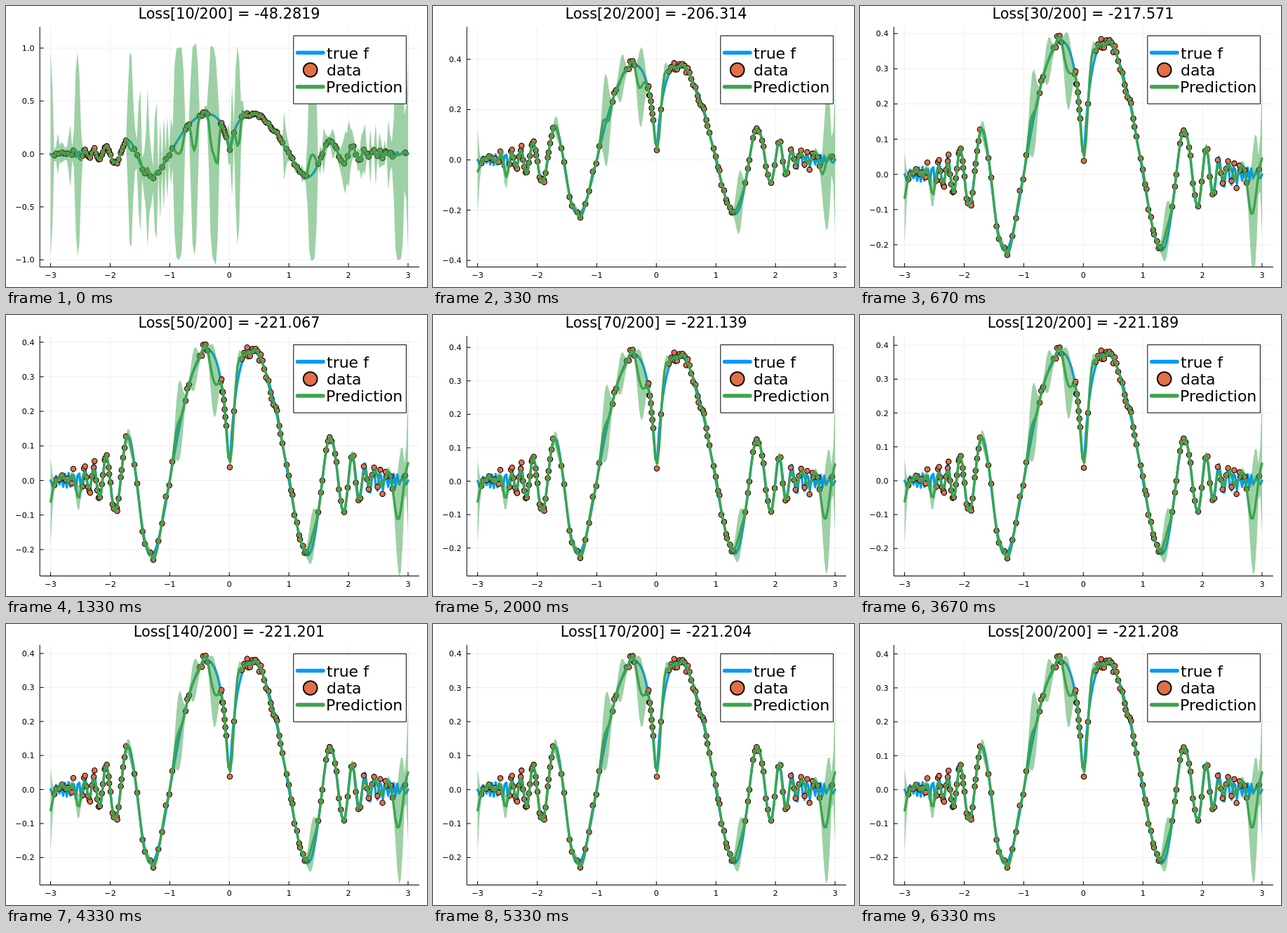
An HTML page with a canvas for the animation above (6660 ms loop, 600 by 400 pixels).

```html
<!DOCTYPE html>
<html lang="en">
<head>
<meta charset="utf-8">
<title>Gaussian process fit</title>
<style>
  html, body { margin: 0; width: 100%; height: 100%; overflow: hidden; background: #fff; }
  canvas { display: block; }
</style>
</head>
<body>
<canvas id="stage" width="600" height="400"></canvas>
<script>
const ctx = document.getElementById('stage').getContext('2d');
const BLUE = '#009af9', ORANGE = '#e26f46', GREEN = '#3da44d';
const LEFT = 48.2, RIGHT = 588.5, TOP = 30, BOTTOM = 371.5;

const toPx = x => 318.3 + 84.9 * x;
const toX = px => (px - 318.3) / 84.9;
const lerp = (a, b, t) => a + (b - a) * t;
const dot = (a, b) => a.reduce((sum, v, i) => sum + v * b[i], 0);

// sinc(|x|^|x|)
function trueF(x) {
  const u = Math.PI * Math.abs(x) ** Math.abs(x);
  return Math.sin(u) / u;
}

let seed = 7;
function random() {
  seed = seed * 16807 % 2147483647;
  return seed / 2147483647;
}

// Noisy samples in clusters: from px, to px, count
const clusters = [
  [69, 96, 9], [109, 171, 33], [183, 237, 11], [256, 261, 3], [276, 287, 5], [306, 314, 8],
  [319, 325, 2], [336, 394, 24], [400, 428, 11], [445, 482, 12], [487, 551, 18], [569, 569, 1]
];
const data = clusters.flatMap(([from, to, count]) =>
  Array.from({ length: count }, (_, i) => {
    const inner = i > 0 && i < count - 1;
    const shift = inner ? 0.8 * (random() - 0.5) : 0;
    const x = toX(lerp(from, to, (i + shift) / Math.max(1, count - 1)));
    return { x, y: trueF(x) + 0.02 * (random() + random() - 1) };
  }));
const grid = Array.from({ length: 200 }, (_, i) => -3 + 6 * i / 199);

// Solves L v = b for a lower triangular L.
function forward(L, b) {
  const v = [];
  for (let i = 0; i < b.length; i++) {
    let sum = b[i];
    for (let j = 0; j < i; j++) sum -= L[i][j] * v[j];
    v.push(sum / L[i][i]);
  }
  return v;
}

// Gaussian process regression; training lengthens the kernel.
function predict(step) {
  const untrained = Math.exp((10 - step) / 6);
  const length = lerp(0.11, 0.036, untrained);
  const variance = lerp(0.55, 1, untrained) ** 2;
  const kernel = (a, b) => variance * Math.exp(-(((a - b) / length) ** 2) / 2);
  const L = [];
  data.forEach((p, i) => {
    const row = forward(L, data.slice(0, i).map(q => kernel(p.x, q.x)));
    row.push(Math.sqrt(variance + 0.0002 - dot(row, row)));
    L.push(row);
  });
  const beta = forward(L, data.map(p => p.y));
  return grid.map(x => {
    const v = forward(L, data.map(p => kernel(x, p.x)));
    return { px: toPx(x), mean: dot(v, beta), std: Math.sqrt(Math.max(0, variance - dot(v, v))) };
  });
}

// step, loss, y of zero, px per unit
const keys = [
  [10, -48.2819, 210.6, 150.7],
  [20, -206.314, 219, 358],
  [30, -217.571, 239.6, 501],
  [50, -221.067, 235.5, 492],
  [70, -221.139, 236.6, 476],
  [100, -221.177, 236.2, 480],
  [140, -221.201, 235.6, 484],
  [200, -221.208, 235.8, 483]
];
function stateAt(step) {
  const n = Math.max(1, keys.findIndex(k => k[0] >= step));
  const a = keys[n - 1], b = keys[n];
  return a.map((v, i) => lerp(v, b[i], (step - a[0]) / (b[0] - a[0])));
}

function text(str, x, y, size, align) {
  ctx.font = size + 'px "DejaVu Sans", sans-serif';
  ctx.textAlign = align;
  ctx.fillStyle = '#000';
  ctx.fillText(str, x, y);
}
function line(points, color, width) {
  ctx.beginPath();
  points.forEach(([x, y]) => ctx.lineTo(x, y));
  ctx.strokeStyle = color;
  ctx.lineWidth = width;
  ctx.stroke();
}
function dotMark(x, y, r, width) {
  ctx.beginPath();
  ctx.arc(x, y, r, 0, 2 * Math.PI);
  ctx.fillStyle = ORANGE;
  ctx.fill();
  ctx.strokeStyle = '#000';
  ctx.lineWidth = width;
  ctx.stroke();
}
const label = (v, digits) => (v < 0 ? '\u2212' : '') + Math.abs(v).toFixed(digits);

function drawAxes(zero, scale) {
  const tick = scale < 200 ? 0.5 : scale < 400 ? 0.2 : 0.1;
  const toY = v => zero - scale * v;
  const xs = [-3, -2, -1, 0, 1, 2, 3], ys = [];
  for (let i = Math.ceil((zero - BOTTOM) / scale / tick); toY(i * tick) > TOP; i++) ys.push(i * tick);
  xs.forEach(x => line([[toPx(x), TOP], [toPx(x), BOTTOM]], '#f0f0f0', 1));
  ys.forEach(y => line([[LEFT, toY(y)], [RIGHT, toY(y)]], '#f0f0f0', 1));
  line([[LEFT, TOP], [LEFT, BOTTOM], [RIGHT, BOTTOM]], '#000', 1);
  xs.forEach(x => {
    line([[toPx(x), BOTTOM], [toPx(x), BOTTOM - 5]], '#000', 1);
    text(label(x, 0), toPx(x), 387.3, 11.2, 'center');
  });
  ys.forEach(y => {
    line([[LEFT, toY(y)], [LEFT + 5, toY(y)]], '#000', 1);
    text(label(y, 1), 40.5, toY(y) + 4, 11.2, 'right');
  });
}

function drawLegend() {
  ctx.beginPath();
  ctx.rect(410.2, 42.4, 160.2, 96.8);
  ctx.fillStyle = '#fff';
  ctx.fill();
  ctx.strokeStyle = '#000';
  ctx.lineWidth = 1;
  ctx.stroke();
  line([[415.5, 66.5], [452, 66.5]], BLUE, 5.5);
  dotMark(433.7, 91, 9.9, 1.8);
  line([[415.5, 115], [452, 115]], GREEN, 5.5);
  text('true f', 457, 75, 22, 'left');
  text('data', 457, 99, 22, 'left');
  text('Prediction', 456, 123, 22, 'left');
}

function draw(step) {
  const [, loss, zero, scale] = stateAt(step);
  const toY = v => zero - scale * v;
  const fit = predict(step);

  ctx.fillStyle = '#fff';
  ctx.fillRect(0, 0, 600, 400);
  ctx.lineCap = ctx.lineJoin = 'round';
  text(`Loss[${step}/200] = ${loss.toPrecision(6)}`, 318, 18.3, 20.8, 'center');
  drawAxes(zero, scale);

  ctx.save();
  ctx.beginPath();
  ctx.rect(LEFT, TOP, RIGHT - LEFT, BOTTOM - TOP);
  ctx.clip();
  line(grid.map(x => [toPx(x), toY(trueF(x))]), BLUE, 3.4);
  data.forEach(p => dotMark(toPx(p.x), toY(p.y), 3.7, 1.1));
  ctx.beginPath();
  fit.forEach(p => ctx.lineTo(p.px, toY(p.mean + p.std)));
  [...fit].reverse().forEach(p => ctx.lineTo(p.px, toY(p.mean - p.std)));
  ctx.globalAlpha = 0.5;
  ctx.fillStyle = GREEN;
  ctx.fill();
  ctx.globalAlpha = 1;
  line(fit.map(p => [p.px, toY(p.mean)]), GREEN, 3.4);
  ctx.restore();
  drawLegend();
}

// Three steps a second, on a 10 ms clock.
let shown = 0;
function tick() {
  const step = 10 + 10 * Math.floor((performance.now() % 6660 + 3.4) * 3 / 1000);
  if (step !== shown) draw(shown = step);
  requestAnimationFrame(tick);
}
tick();
</script>
</body>
</html>
```
